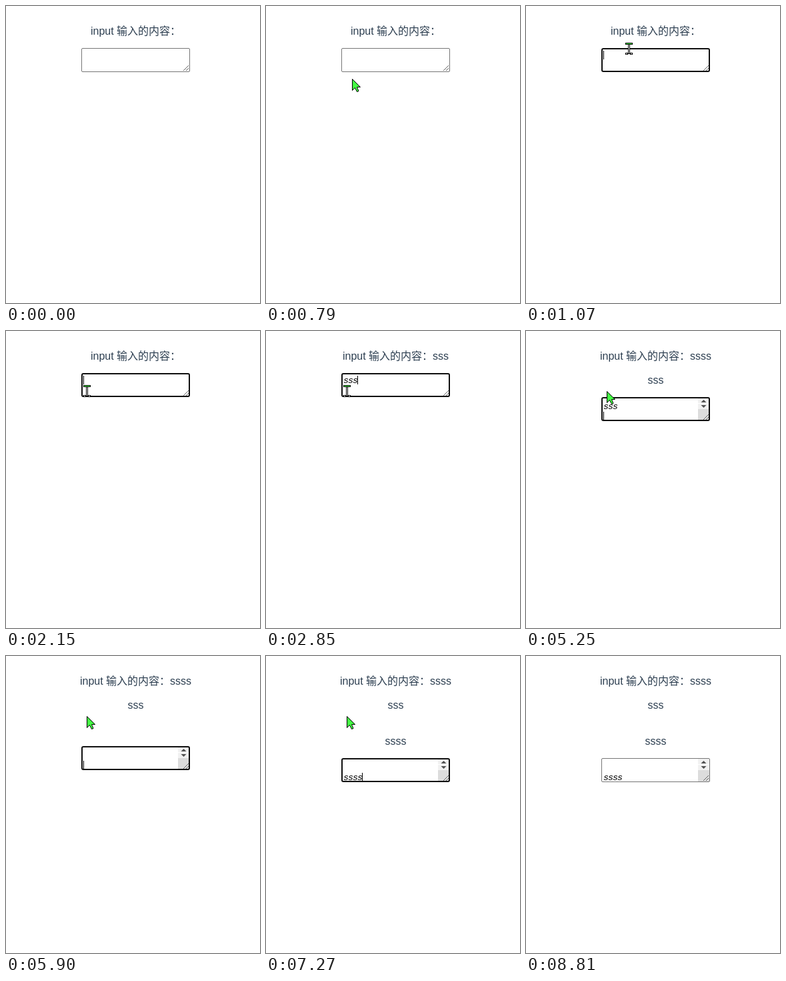
These frames come from a looping animation (381 px wide and 445 px high, 8870 ms). An HTML page:

```html
<!DOCTYPE html>
<html lang="zh-CN">
<head>
<meta charset="utf-8">
<style>
  html, body { margin: 0; width: 100%; height: 100%; overflow: hidden; background: #fff; }
  svg { display: block; }
  .out { font: 300 16px "Liberation Sans", "Noto Sans CJK SC", "Noto Sans CJK", sans-serif; fill: #2c3e50; text-anchor: middle; }
  .typed { font: italic 13.333px "Liberation Mono", monospace; letter-spacing: -1px; }
</style>
</head>
<body>
<svg id="stage" width="381" height="445" viewBox="0 0 381 445"></svg>
<script>
const LOOP = 8870, LEFT = 113, WIDTH = 163, HEIGHT = 36;
const FOCUS = 1070, BLUR = 8810, BLINK = 530, STEP = 46;

// Bursts of evenly spaced key presses
const BURSTS = [
  { start: 2480, gap: 185, keys: 'ssss' },
  { start: 3330, gap: 330, keys: '\n\n' },
  { start: 4120, gap: 380, keys: 'sss' },
  { start: 5250, gap: 325, keys: '\n\n\n' },
  { start: 6330, gap: 313, keys: 'ssss' }
];
const PRESSES = BURSTS.flatMap(({ start, gap, keys }) =>
  [...keys].map((key, i) => ({ key, time: start + i * gap })));

// Pointer strokes; the pointer is in the window from ENTER to LEAVE
const ENTER = 510, LEAVE = 8350;
const STROKES = [
  { start: ENTER, steps: 12, from: [21, 300], to: [154, 64], ease: p => 1 - (1 - p) ** 2.4 },
  { start: 1554, steps: 4, from: [154, 64], to: [121, 90], ease: p => p },
  { start: 8104, steps: 4, from: [121, 90], to: [13, 252], ease: p => p }
];

const stage = document.getElementById('stage');
const rect = (x, y, w, h, attrs) => `<rect x="${x}" y="${y}" width="${w}" height="${h}" ${attrs}/>`;
const path = (d, attrs) => `<path d="${d}" ${attrs}/>`;
const at = (x, y, body) => `<g transform="translate(${x} ${y})">${body}</g>`;

const GREEN = 'fill="#4f4" stroke="#000"', WHITE = 'fill="#fff" stroke="#000"';
const ARROW = path('M.5 .5V17.5L4.5 13.5L7.5 19.5L10 18.5L7.5 12.5H12.5Z', GREEN);
const IBEAM = at(-5, -9,
  rect(4.5, 2.5, 2, 14, WHITE) + rect(.5, .5, 10, 2, GREEN) +
  rect(.5, 15.5, 3, 2, WHITE) + rect(7.5, 15.5, 3, 2, WHITE));
const ridge = (y, color) => at(0, y,
  path('M161 26L153 34M161 30L157 34', `stroke="${color}" stroke-opacity=".6" shape-rendering="crispEdges"`));
const GRIP = ridge(0, '#000') + ridge(1, '#fff');
const SCROLLBAR =
  rect(145, 1, 17, 8, 'fill="#f1f1f1"') + rect(145, 10, 17, 8, 'fill="#f1f1f1"') +
  rect(145, 18, 17, 17, 'fill="#dcdcdc"') +
  path('M149.5 8L153.5 4L157.5 8ZM149.5 12L153.5 16L157.5 12Z', 'fill="#505050"');

function output(text) {
  const lines = ('input 输入的内容：' + text).replace(/\n$/, '').split('\n');
  const body = lines.map((line, i) => `<text class="out" x="194.5" y="${43 + 18 * i}">${line}</text>`);
  return { body: body.join(''), count: lines.length };
}

function textarea(text, focused, idle) {
  const lines = text.split('\n'), row = lines.length - 1;
  const scroll = row > 1 ? 15 * row - 18 : 0;
  const top = i => 3 + 15 * i - scroll;
  let inner = lines.map((line, i) => `<text class="typed" x="2" y="${top(i) + 11}">${line}</text>`).join('');
  const caretOn = focused && Math.floor(idle / BLINK) % 2 === 0;
  if (caretOn) inner += rect(2 + 7 * lines[row].length, top(row), 1, 13, '');
  const frame = focused
    ? rect(1, 1, WIDTH - 2, HEIGHT - 2, 'rx="2" fill="none" stroke="#101010" stroke-width="2"')
    : rect(.5, .5, WIDTH - 1, HEIGHT - 1, 'rx="1.5" fill="none" stroke="#767676"');
  return `<svg x="1" y="1" width="${WIDTH - 2}" height="${HEIGHT - 2}">${inner}</svg>` +
    (row > 1 ? SCROLLBAR : '') + GRIP + frame;
}

function pointer(t, boxTop) {
  if (t < ENTER || t >= LEAVE) return '';
  const { start, steps, from, to, ease } = STROKES.findLast(s => s.start <= t);
  const p = ease(Math.min(1, Math.floor((t - start) / STEP) / steps));
  const [x, y] = from.map((a, i) => Math.round(a + (to[i] - a) * p));
  const inside = x >= LEFT && x < LEFT + WIDTH && y >= boxTop && y < boxTop + HEIGHT;
  return at(x, y, inside ? IBEAM : ARROW);
}

let shown;
function draw(t) {
  const done = PRESSES.filter(press => press.time <= t);
  const text = done.map(press => press.key).join('');
  const idle = t - (done.length ? done[done.length - 1].time : FOCUS);
  const out = output(text), boxTop = 63 + 18 * (out.count - 1);
  const box = textarea(text, t >= FOCUS && t < BLUR, idle);
  const scene = out.body + at(LEFT, boxTop, box) + pointer(t, boxTop);
  if (scene !== shown) stage.innerHTML = shown = scene;
}

const start = performance.now();
function tick() {
  draw((performance.now() - start) % LOOP);
  requestAnimationFrame(tick);
}
tick();
</script>
</body>
</html>
```
